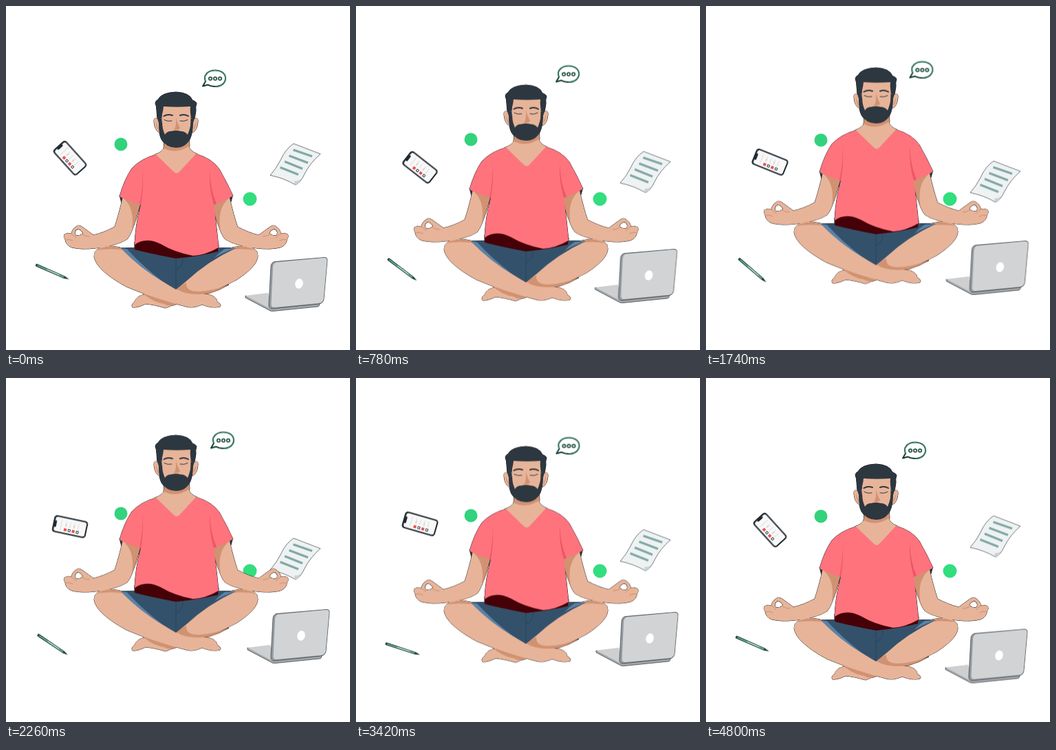
These frames come from a looping animation (500x500 px, 4820 ms). An HTML page:

```html
<!DOCTYPE html>
<html lang="en">
<head>
<meta charset="utf-8">
<title>Meditation</title>
<style>
  html, body { margin: 0; width: 100%; height: 100%; overflow: hidden; background: #fff; }
  svg { display: block; width: 100%; height: 100%; }
  .skin { fill: #e7b499; }
  .shade { fill: #d19272; }
  .hair { fill: #2d3740; }
  .edge { stroke: #1d2226; stroke-width: .6; stroke-linejoin: round; }
  .line { fill: none; stroke-linecap: round; }

  .move { animation: 4820ms linear infinite; }
  #float { animation-name: bob; animation-timing-function: cubic-bezier(.37, 0, .63, 1); }
  #paper { animation: drop 2410ms linear infinite alternate; }
  #phone { animation-name: phone; }
  #pen { animation-name: pen; }
  #badge { animation-name: badge; }
  #bubble { animation-name: bubble; }
  #laptop { animation-name: laptop; }

  @keyframes bob { 49% { transform: translateY(-42px); } }
  @keyframes drop { to { transform: translateY(35px); } }
  @keyframes phone {
    0%, 100% { transform: translate(93px, 221px) rotate(48deg); }
    8% { transform: translate(93px, 228.5px) rotate(43.5deg); }
    16.2% { transform: translate(93px, 234.5px) rotate(38deg); }
    26.1% { transform: translate(93px, 237px) rotate(32deg); }
    36% { transform: translate(93px, 227px) rotate(22deg); }
    46.9% { transform: translate(93px, 216px) rotate(12deg); }
    55% { transform: translate(93px, 213px) rotate(10.5deg); }
    63% { transform: translate(93px, 212px) rotate(12deg); }
    71% { transform: translate(93px, 212px) rotate(16deg); }
    78% { transform: translate(93px, 214.5px) rotate(27deg); }
    85.5% { transform: translate(93px, 218px) rotate(38deg); }
  }
  @keyframes pen {
    0%, 100% { transform: translate(67px, 386.5px) rotate(23.6deg); }
    16.2% { transform: translate(67px, 383px) rotate(37deg); }
    26.1% { transform: translate(67px, 381.5px) rotate(44deg); }
    30% { transform: translate(67px, 382px) rotate(44.5deg); }
    46.9% { transform: translate(67.5px, 387.5px) rotate(34deg); }
    56% { transform: translate(67.5px, 391.5px) rotate(23deg); }
    66% { transform: translate(67.5px, 394px) rotate(17.5deg); }
    71% { transform: translate(67.5px, 394px) rotate(18deg); }
    85.5% { transform: translate(67.5px, 389px) rotate(22deg); }
  }
  @keyframes badge {
    0%, 86%, 100% { transform: none; }
    16.2% { transform: translateY(-7px); }
    22% { transform: translateY(-8.3px); }
    26.1% { transform: translateY(-8px); }
    46.9% { transform: translateY(-4px); }
    71% { transform: translateY(-1px); }
  }
  @keyframes bubble {
    0%, 100% { transform: none; }
    16.2% { transform: translate(5px, -6.4px); }
    26.1% { transform: translate(8px, -9.7px); }
    34% { transform: translate(10px, -12px); }
    46.9% { transform: translate(12px, -14.7px); }
    56% { transform: translate(9.6px, -11.8px); }
    67.6% { transform: translate(6.2px, -7.7px); }
    78.4% { transform: translate(3.6px, -4.5px); }
    90% { transform: translate(1.2px, -1.5px); }
  }
  @keyframes laptop {
    0%, 100% { transform: none; }
    16.2% { transform: translate(-.5px, -12px); }
    26.1% { transform: translate(0, -18.8px); }
    34% { transform: translate(1px, -23px); }
    46.9% { transform: translate(3px, -29px); }
    55% { transform: translate(3.5px, -30px); }
    67.2% { transform: translate(2px, -27px); }
    71% { transform: translate(1px, -25px); }
    78.4% { transform: translate(.5px, -20px); }
    85.5% { transform: translate(-.5px, -13.3px); }
    89.6% { transform: translate(0, -9px); }
  }
</style>
</head>
<body>
<svg viewBox="0 0 500 500">
  <circle cx="354.5" cy="280.5" r="10" fill="#32de7e"/>
  <circle id="badge" class="move" cx="167" cy="201" r="9.5" fill="#33d27c"/>

  <g id="paper">
    <path class="edge" fill="#eff2f2" d="M418 200L457 215Q442 228 434 244Q428 257 421 260Q404 250 384 246Q393 236 399 224Q406 208 418 200Z"/>
    <path fill="#c9d2d3" d="M421 260Q418 257 420 254Q426 255 430 250Q426 258 421 260Z"/>
    <path class="line" style="stroke-linecap:butt" stroke="#80a8a5" stroke-width="3.3" d="M417.500 209L445 218.500M411.500 217.500L439 228M405 226L431 236.500M398.500 234.500L425 245"/>
  </g>

  <g id="laptop" class="move">
    <path class="edge" fill="#a3a7aa" d="M348 421L348 424L384 443Q386 444 389 443.500L453 437Q456 437 456 431L390 430Z"/>
    <path fill="#cdcfd1" d="M348 421L381 417L386 437L455 432L388 440Q385 441 382 439Z"/>
    <path class="edge" fill="#92989e" d="M391 371.500L462 365.500Q467.500 365 467 370L462 426Q461 432 455 433L387 440Q381 440 382 433L385 378Q386 372 391 371.500Z"/>
    <path fill="#d1d3d4" d="M393 372.500L462 366Q467 366 466.500 371L461.500 426Q460.500 431 455 432L390 438Q385 438 385.500 433L388 379Q389 373 393 372.500Z"/>
    <ellipse cx="426" cy="403.500" rx="5.700" ry="7.300" fill="#fff" transform="rotate(15 426 403.500)"/>
  </g>

  <g id="phone" class="move">
    <rect x="-25" y="-12.500" width="50" height="25" rx="4.500" fill="#1f2930"/>
    <rect x="-22.500" y="-10.500" width="45.500" height="21" rx="3" fill="#f8f8f8"/>
    <rect x="-23" y="-5" width="3" height="10" rx="1.500" fill="#1f2930"/>
    <path class="line" stroke="#d7dadb" d="M-13 -7V7M-6 -6V2M0 -6V2M6 -6V2M12 -6V2"/>
    <path class="line" stroke="#e8a3a0" d="M-6 -2V0M6 -2V0"/>
    <path fill="#ef4f50" d="M-8 4h4v4h-4zM4 4h4v4h-4z"/>
    <path fill="#fff" stroke="#29343a" d="M-1.500 4.500h3v3h-3zM10.500 4.500h3v3h-3z"/>
  </g>

  <g id="pen" class="move">
    <path fill="#1b3c37" d="M-26 -1.400L-24 -1.900L20 -1.700L27 0L20 1.700L-24 1.900L-26 1.400Z"/>
    <path class="line" stroke="#6fcba6" stroke-width="1.600" d="M-23 0H18"/>
    <path class="line" stroke="#e6f1ed" stroke-width="1" d="M-8 -.2H11"/>
  </g>

  <g id="bubble" class="move">
    <path id="balloon" fill="#fff" stroke="#163d34" stroke-width="2" stroke-linejoin="round" d="M286 116.500L290 109.500C286 100 294 93.500 304 93.500C313 93.500 319 98.500 319 105C319 112 313 117 304 117C299 117 296 116 293.500 114.500Z"/>
    <path fill="none" stroke="#4cc492" stroke-width=".8" d="M290 109.500C286 100 294 93.500 304 93.500C313 93.500 319 98.500 319 105C319 112 313 117 304 117"/>
    <g fill="#d9efe6" stroke="#1c463c" stroke-width="1.500">
      <circle cx="297" cy="105.500" r="2.300"/><circle cx="304" cy="105.500" r="2.300"/><circle cx="311" cy="105.500" r="2.300"/>
    </g>
  </g>

  <g id="float" class="move">
    <use href="#man" stroke="#15191c" stroke-width="1" stroke-linejoin="round"/>
    <g id="man">
      <!-- legs -->
      <path class="skin" d="M318 354Q334 349 346 349Q366 350 366 363Q366 378 335 398Q305 415 250 431Q240 436 232 439Q215 434 203 433Q190 439 184 438Q181 434 187 430Q190 420 205 419L247 409Q300 365 318 354Z"/>
      <path class="shade" d="M196 415Q222 425 249 433Q238 438 230 433Q211 430 196 415Z"/>
      <path class="skin" d="M177 354Q161 349 149 349Q128 350 128 364Q131 384 175 408Q215 425 262 437Q272 440 285 434Q300 440 311 437Q314 434 307 430Q306 421 292 419Q268 420 247 411Q190 380 177 354Z"/>
      <path class="shade" d="M262 402Q252 407 247 411Q264 422 294 418Q311 413 324 405Q290 418 270 414Q261 411 262 402Z"/>
      <path class="shade" d="M132 355Q150 344 180 356Q152 351 132 355ZM362 355Q344 344 314 356Q342 351 362 355Z"/>

      <!-- shorts -->
      <path fill="#34516b" d="M167 352Q200 350 247 358Q300 350 334 352Q293 371 262 400L247 412Q200 385 167 352Z"/>
      <path fill="#5b82a6" d="M167 352L176 353.500Q199 379 230 402Q193 380 167 352ZM334 352L318 353Q310 358 303 366Q316 358 334 352Z"/>
      <path class="line" stroke="#253f56" stroke-width=".8" d="M247 368V410M257 367Q258 378 248 383"/>

      <!-- arms -->
      <g id="arm">
        <path class="hair" d="M165 275L168 286L197 300L197 286Z"/>
        <path class="skin" fill-rule="evenodd" d="M170 277Q164 303 158 321Q141 330 127 333Q119 327 112 322Q106 317.500 103 320Q96 324 95 331Q89 329 85 332Q83 335 86 339Q87 348 96 351Q110 354.500 130 352Q160 349 176 339Q183 331 188 310L195 288ZM100 329Q102 323.500 105.500 324Q111 327 112 330.500Q107 334.500 102 334Q100 332 100 329Z"/>
        <path class="shade" d="M169 278L195 288L189 310Q186 320 183 324Q188 293 169 278Z"/>
        <path class="line" stroke="#c98b6d" stroke-width=".9" d="M95 331Q99 333 102 337M86 340Q92 338 97 341M111 332Q115 335 121 335"/>
      </g>
      <use href="#arm" transform="matrix(-1 0 0 1 494.500 0)"/>

      <!-- torso -->
      <path fill="#450107" d="M187 343L225 335L309 347L308 357Q280 364 247 367Q210 360 187 354Z"/>
      <path class="skin" d="M230 195L230 205Q228 212 216 216L248 246L278 215Q267 211 266 204L266 195Z"/>
      <path class="shade" d="M230 199L229 207Q248 216 267 203L266 195Z"/>
      <path fill="#ff737d" d="M218 216L244 241Q248 245 252 241L276 215Q300 222 310 237Q322 258 330 276Q318 283 302 289Q306 320 309 351Q290 362 272 363Q245 358 225 346Q203 335 187 347Q188 318 196 289Q178 284 165 277Q172 252 183 236Q196 222 218 216Z"/>
      <path fill="#ee5663" d="M199 238Q200 266 196 289L194 288.500Q199 266 199 238ZM296 238Q295 266 302 289L306 287.500Q297 268 296 238Z"/>

      <!-- head -->
      <path class="skin" d="M222 165Q214.500 160 215 168Q216 181 223 184ZM272 165Q279.500 160 279 168Q278 181 271 184Z"/>
      <path class="shade" d="M218 168Q218 177 222 181ZM276 168Q276 177 272 181Z"/>
      <path class="skin" d="M226 142H269L268 190H228Z"/>
      <path class="hair" d="M217 141Q218 137 221 136Q226 126 247 125Q267 126 271 137Q275 138 277 141Q275 147 276 152Q275 162 272 170Q271 186 267 194Q261 206 247 206Q233 206 226 194Q222 186 222 170Q219 162 219 152Q219 146 217 141ZM229 146Q228 156 225 163Q227 178 231 187Q234 182 240 182Q247 180 254 182Q260 182 264 187Q268 178 270 163Q267 156 268 146Q248 147.500 229 146Z" fill-rule="evenodd"/>
      <path class="shade" d="M247 161Q249 171 253 177Q251 181 244 180Q248 176 247 161Z"/>
      <g class="line" stroke="#2d3740">
        <path stroke-width="2" d="M229.500 160Q235 156.500 242 159M253 159Q259 156.500 265 160"/>
        <path stroke-width="1" d="M230 165.500Q235 168.500 241 167M253 167Q259 168.500 264 165.500"/>
      </g>
    </g>
  </g>
</svg>
</body>
</html>
```
